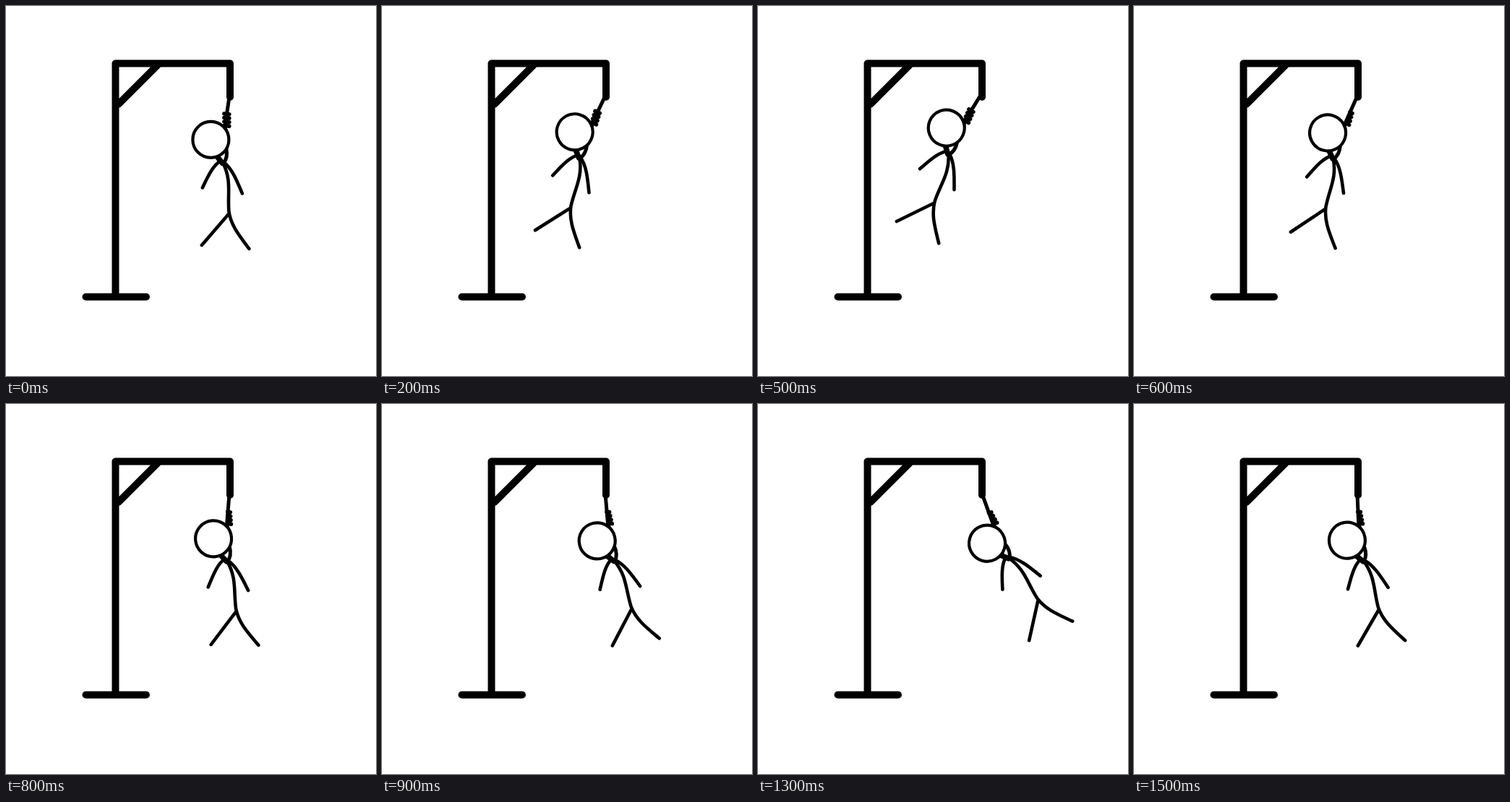
These frames come from a looping animation (512x512 px, 1.6 s). An HTML page:

```html
<!DOCTYPE html>
<html lang="en">
<head>
<meta charset="utf-8">
<title>Swinging stick figure</title>
<style>
  html, body { margin: 0; height: 100%; overflow: hidden; background: #fff; }
  svg { display: block; width: 100%; height: 100%; }
  path, circle { fill: none; stroke: #000; stroke-linecap: round; stroke-linejoin: round; }
  circle { fill: #fff; }
</style>
</head>
<body>
<svg viewBox="0 0 512 512">
  <path stroke-width="10" d="M151.5 402V79.5H310V126M110.5 402.5H194M155.5 136L210 81.5"/>
  <g id="figure" stroke-width="4.6">
    <path stroke-width="5" d="M309.5 127L303.5 168Q309 183 305.5 198Q308 211 301 219"/>
    <path id="knot" stroke-width="5.5"/>
    <path d="M298 214.5C288 220 281 234 272.5 252M302 217C313 225 320 242 327.5 260"/>
    <path d="M301 218C313 242 307 260 309 285C312 305 324 319 337 336.5M309 288L271.5 331.5"/>
    <path stroke-width="7.5" d="M293.5 210L300 218"/>
    <circle cx="284" cy="185.5" r="25" stroke-width="4.2"/>
  </g>
</svg>
<script>
  const STEP = 100, STEPS = 16;
  const LEFT = { start: 0, peak: 4, end: 7.65, angle: 28 };
  const RIGHT = { start: 7.65, peak: 12, end: STEPS, angle: -33.4 };
  const figure = document.getElementById('figure');
  const knot = document.getElementById('knot');

  // Each swing slows towards its peak and speeds up away from it.
  function swingAngle(step) {
    const { start, peak, end, angle } = step < LEFT.end ? LEFT : RIGHT;
    const edge = step < peak ? start : end;
    return angle * (1 - ((step - peak) / (edge - peak)) ** 1.35);
  }

  function coils(left) {
    let d = '';
    for (let y = 149.5; y < 168; y += 5.5) d += `M${left} ${y}L309.5 ${y + 1}`;
    return d;
  }

  function draw(now) {
    const step = Math.floor(now / STEP) % STEPS;
    const angle = swingAngle(step);
    // The rope gives a little as the body swings out.
    const drift = -0.6 - 28 * Math.sin(angle * Math.PI / 180) ** 3;
    figure.setAttribute('transform', `translate(${drift} ${drift}) rotate(${angle} 309 127)`);
    knot.setAttribute('d', coils(step < 6 ? 302.5 : 306));
    requestAnimationFrame(draw);
  }
  draw(performance.now());
</script>
</body>
</html>
```
